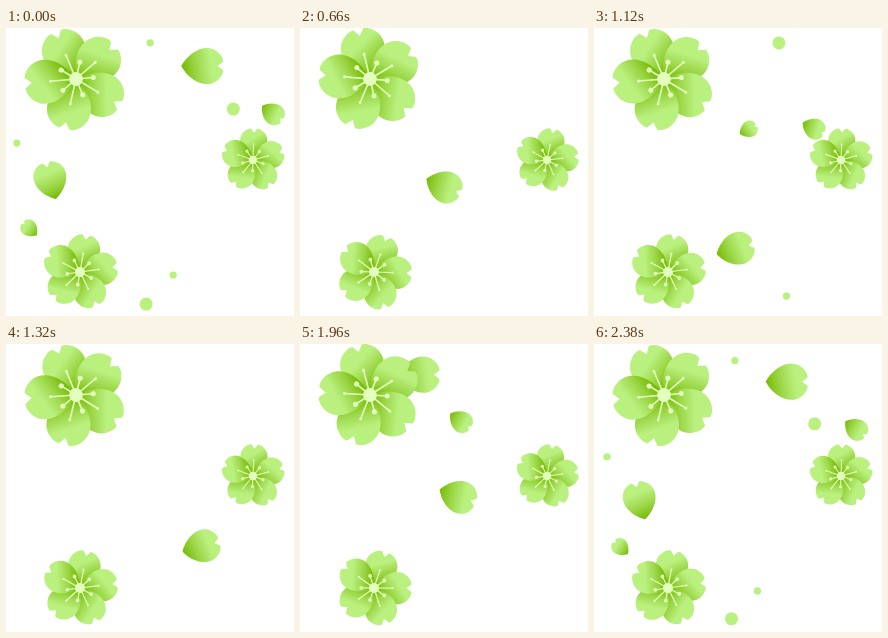
An HTML page with a canvas that plays this animation: 288x288 px, repeating every 2400 ms.

```html
<!DOCTYPE html>
<html>
<head>
<meta charset="utf-8">
<style>
html, body { margin: 0; width: 100%; height: 100%; overflow: hidden; background: #fff; }
canvas { display: block; }
</style>
</head>
<body>
<canvas id="stage" width="288" height="288"></canvas>
<script>
const ctx = document.getElementById('stage').getContext('2d');
const LOOP = 2400, FRAME = 20, TAU = Math.PI * 2, DEG = Math.PI / 180;
const LIGHT = '#b9f07e', MID = '#9bd646', DARK = '#7abd0c', PALE = '#e2ffbd';

// x, y, radius, resting angle of the first petal
const flowers = [[70, 51, 51, -113], [247, 132, 31.5, -88], [74, 244, 37.5, -80]];

// length, angle, then x, y, time at the start and at the end of the flight
const petals = [
  [42, 0, 90, 28, 1800, 196, 38, 2400],
  [38, -105, 74, 244, 1960, 45, 153, 2400],
  [19, -138, 74, 244, 2080, 24, 201, 2400],
  [25, 36, 95, 72, 1690, 266, 85, 2400],
  [38, 20, 88, 72, 1690, 193, 193, 2100],
  [37, 23, 88, 72, 400, 175, 207, 810],
  [24, 27, 95, 62, 720, 219, 100, 1120],
  [19, -27, 90, 216, 720, 154, 102, 1120],
  [38, -15, 95, 237, 950, 235, 189, 1470]
];

// radius, then the same flight
const dots = [
  [3.6, 70, 51, 1960, 144, 15, 2400],
  [6.5, 80, 53, 1960, 227, 81, 2400],
  [3.6, 70, 51, 1840, 11, 115, 2400],
  [3.6, 74, 244, 1900, 167, 247, 2400],
  [6.5, 74, 244, 1900, 140, 276, 2400],
  [6.5, 82, 48, 680, 194, 12, 1160],
  [3.6, 84, 246, 680, 202, 270, 1160]
];

const petalShape = new Path2D(
  'M0 0C.2-.36 .6-.56 .87-.34Q1-.22 1-.1L.87 0L1 .1Q1 .22 .87 .34C.6 .56 .2 .36 0 0Z');

function gradient(x0, y0, x1, y1) {
  const g = ctx.createLinearGradient(x0, y0, x1, y1);
  g.addColorStop(0, DARK);
  g.addColorStop(0.45, MID);
  g.addColorStop(1, LIGHT);
  return g;
}
const looseFill = gradient(0.05, 0.05, 0.7, -0.05);
const flowerFill = gradient(0.22, 0.22, 0.66, -0.06);

function disc(x, y, r, color) {
  ctx.fillStyle = color;
  ctx.beginPath();
  ctx.arc(x, y, r, 0, TAU);
  ctx.fill();
}

function placed(x, y, angle, scale, draw) {
  ctx.save();
  ctx.translate(x, y);
  ctx.rotate(angle * DEG);
  ctx.scale(scale, scale);
  draw();
  ctx.restore();
}

function fly(t, [x0, y0, t0, x1, y1, t1], draw) {
  const k = (t - t0) / (t1 - t0);
  if (k >= 0 && t < t1 + FRAME) draw(x0 + (x1 - x0) * k, y0 + (y1 - y0) * k);
}

function stamen(length, knob) {
  ctx.beginPath();
  ctx.moveTo(0, 0);
  ctx.lineTo(length, 0);
  ctx.stroke();
  disc(length, 0, knob, PALE);
}

function drawFlower() {
  const turn = 72 * DEG;
  for (let i = 0; i < 5; i++, ctx.rotate(turn)) {
    ctx.fillStyle = flowerFill;
    ctx.fill(petalShape);
  }
  ctx.strokeStyle = PALE;
  ctx.lineWidth = 0.032;
  for (let i = 0; i < 5; i++, ctx.rotate(turn)) {
    stamen(0.5, 0.03);
    ctx.rotate(turn / 2);
    stamen(0.34, 0.05);
    ctx.rotate(-turn / 2);
  }
  disc(0, 0, 0.135, PALE);
}

function frame(now) {
  let t = now % LOOP;
  const sway = 5 - 5 * Math.cos(TAU * t / (LOOP / 2));
  if (t < FRAME) t += LOOP;
  ctx.clearRect(0, 0, 288, 288);
  for (const [r, ...path] of dots)
    fly(t, path, (x, y) => disc(x, y, r, LIGHT));
  for (const [size, angle, ...path] of petals)
    fly(t, path, (x, y) => placed(x, y, angle, size, () => {
      ctx.translate(-0.5, 0);
      ctx.fillStyle = looseFill;
      ctx.fill(petalShape);
    }));
  for (const [x, y, r, angle] of flowers)
    placed(x, y, angle + sway, r, drawFlower);
  requestAnimationFrame(() => frame(performance.now() - start));
}
const start = performance.now();
frame(0);
</script>
</body>
</html>
```
